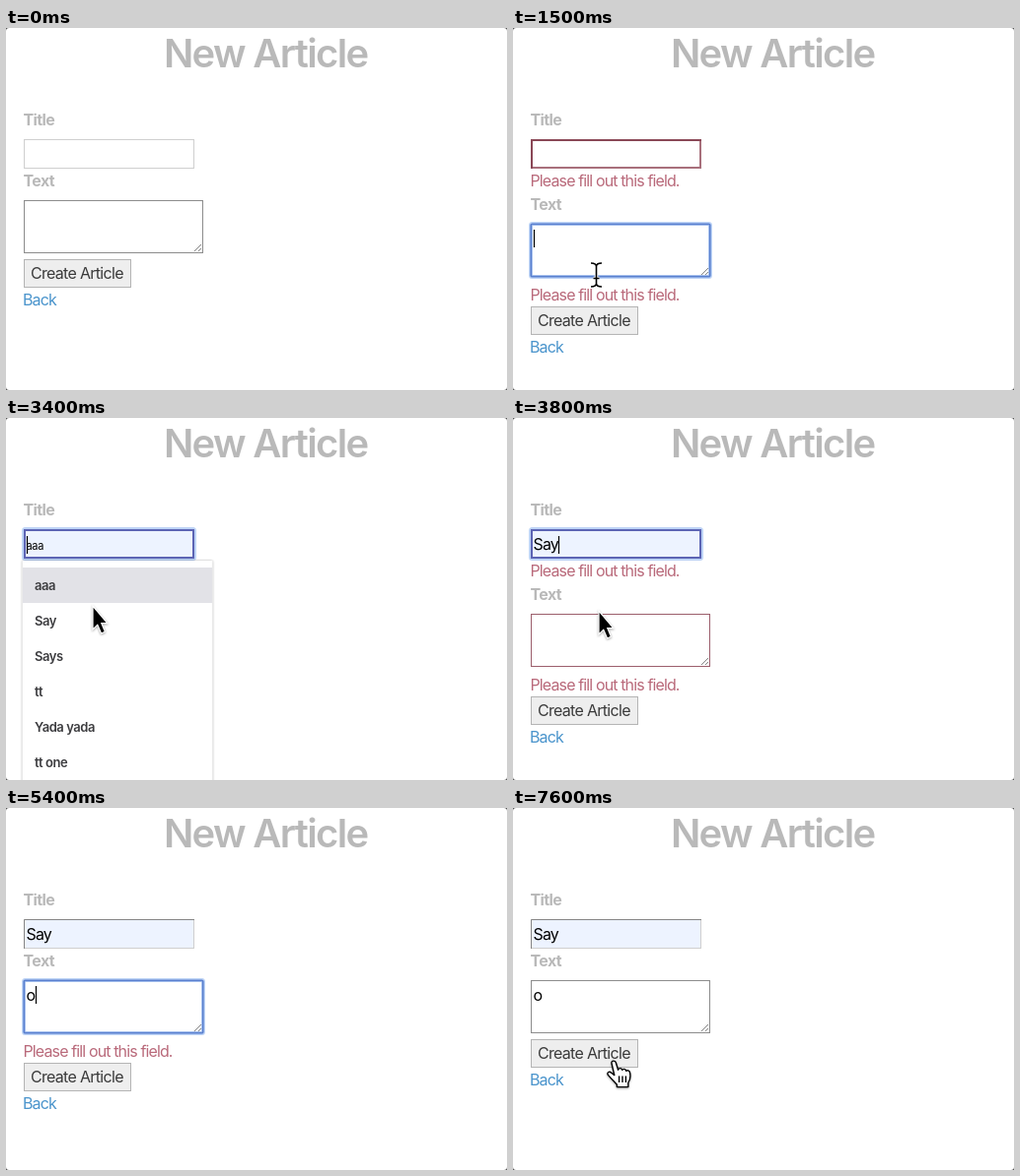
These frames come from a looping animation (508 px wide and 368 px high, 8000 ms). An HTML page:

```html
<!DOCTYPE html>
<html lang="en">
<head>
<meta charset="utf-8">
<title>New Article</title>
<style>
  html, body { margin: 0; width: 100%; height: 100%; overflow: hidden; background: #fff; }
  svg { display: block; width: 508px; height: 368px; }
  text { font: 400 16px Inter, "Open Sans", sans-serif; font-optical-sizing: none; letter-spacing: -.85px; }
  .heading { font-size: 40px; font-weight: 600; letter-spacing: -1.65px; text-anchor: middle; fill: #b9b9b9; }
  .label { font-weight: 700; letter-spacing: -.6px; fill: #b9b9b9; }
  .error { fill: #b9697a; letter-spacing: -.87px; }
  .link { fill: #4a94cc; letter-spacing: -.9px; }
  .button { fill: #3a3a3a; letter-spacing: -.7px; }
  .preview { font-size: 11px; letter-spacing: -.35px; }
  .menu text { font-size: 13px; font-weight: 600; letter-spacing: -.45px; fill: #3c3c3f; }
  .menu .panel { fill: #fff; filter: drop-shadow(0 0 1px rgba(0, 0, 0, .35)); }
  .ring { fill: none; }
  .ring .glow { stroke: #7fa9ee; stroke-opacity: .5; stroke-width: 4; }
  .ring .line { stroke: #5a80cf; stroke-width: 1.8; }
  .caret { stroke: #000; stroke-width: 1.2; }
  .pointer { filter: drop-shadow(0 1px 1px rgba(0, 0, 0, .35)); }
</style>
</head>
<body>
<svg viewBox="0 0 508 368">
  <rect width="508" height="368" fill="#fff"/>
  <text class="heading" x="263.2" y="40">New Article</text>
  <text class="label" x="17.5" y="99">Title</text>

  <g id="title">
    <rect id="titleBox" x="18.5" y="113.5" width="172" height="29" stroke="#cfcfcf"/>
    <path id="titleEdge" d="M18.5 143V113.5H191" fill="none"/>
    <g id="titleRed" fill="none" stroke-width="2">
      <path d="M18 142H190V113" stroke="#a8707c"/>
      <path d="M19 143V114H191" stroke="#8a4756"/>
    </g>
    <g class="ring" id="titleRing">
      <rect class="glow" x="18" y="113" width="173" height="30" rx="1.5"/>
      <rect x="19" y="114" width="171" height="28" stroke="#5c64b4" stroke-width="2"/>
    </g>
    <text id="titleText" x="20.5" y="134"></text>
  </g>
  <text class="error" id="titleError" x="17.5" y="161">Please fill out this field.</text>

  <g id="body">
    <text class="label" x="17.5" y="161">Text</text>
    <rect id="bodyBox" x="18.5" y="175.5" width="181" height="53" fill="#fff"/>
    <g class="ring" id="bodyRing">
      <rect class="glow" x="18" y="175" width="182" height="54" rx="1.5"/>
      <rect class="line" x="18.3" y="175.3" width="181.4" height="53.4" rx="1"/>
    </g>
    <path d="M191 227l7-7M195 227l3-3" stroke="#777" stroke-width=".9"/>
    <text id="bodyText" x="20.5" y="196"></text>
    <text class="error" id="bodyError" x="17.5" y="253">Please fill out this field.</text>
  </g>

  <g id="footer">
    <rect x="18.5" y="235.5" width="108" height="28" fill="#eee" stroke="#b4b4b4"/>
    <text class="button" x="25" y="255">Create Article</text>
    <text class="link" x="17" y="282">Back</text>
  </g>

  <g class="menu" id="menu">
    <rect class="panel" x="16.5" y="145" width="193" height="240" rx="1"/>
    <rect id="hover" x="17" width="192" height="36" fill="#e2e2e7"/>
  </g>
  <path class="caret" id="caret"/>

  <g id="pointer">
    <g class="pointer" id="arrow">
      <path d="M0 0V24L4.8 19.2L8.6 28L12.4 26.3L8.8 17.6H14.8Z" fill="#000" stroke="#fff" stroke-width="1.2"/>
    </g>
    <g id="beam" fill="none">
      <path d="M-5-12Q.5-12 .5-8.5Q.5-12 6-12M.5-9V9M-5 12Q.5 12 .5 8.5Q.5 12 6 12M-2.5 3.5H3.5" stroke="#fff" stroke-width="3.4"/>
      <path d="M-5-12Q.5-12 .5-8.5Q.5-12 6-12M.5-9V9M-5 12Q.5 12 .5 8.5Q.5 12 6 12M-2.5 3.5H3.5" stroke="#000" stroke-width="1.6"/>
    </g>
    <g class="pointer" id="hand" stroke="#000" stroke-width="1.4" stroke-linejoin="round" stroke-linecap="round">
      <path fill="#fff" d="M-2 2.5C-2.6-.2 1.4-.8 2.3 1.8L4.6 9.2C5 7.2 8.2 7 8.8 9.4C9.4 7.8 12.2 8 12.8 10.3C13.6 9.2 16.2 9.6 16.6 12.2C17.3 16.2 17 19.6 14.8 22.4V26.6H3.4V24.2C.6 21.2-2.4 18.2-5.6 14.4C-7.2 11.6-4.2 10.2-2.2 12.2L.8 14.6Z"/>
      <path fill="none" d="M5.6 16v5.4M9 16v5.4M12.4 16v5.4"/>
    </g>
  </g>

  <path d="M0 0H3Q0 0 0 3ZM508 0V3Q508 0 505 0ZM0 368V365Q0 368 3 368ZM508 368H505Q508 368 508 365Z" fill="#444"/>
</svg>
<script>
const LOOP = 8000;
const $ = id => document.getElementById(id);
const svgNS = 'http://www.w3.org/2000/svg';

['aaa', 'Say', 'Says', 'tt', 'Yada yada', 'tt one'].forEach((word, i) => {
  const item = document.createElementNS(svgNS, 'text');
  item.setAttribute('x', 29);
  item.setAttribute('y', 175 + 36 * i);
  item.textContent = word;
  $('menu').append(item);
});

// start time, x, y, shape; the pointer moves in 100 ms steps
const moves = [
  [100, 338, 12, 'arrow'], [200, 262, 84, 'arrow'], [300, 168, 190, 'arrow'],
  [400, 76, 286, 'arrow'], [500, 36, 306, 'arrow'], [600, 66, 272, 'arrow'],
  [700, 84, 251, 'hand'], [1500, 84, 251, 'beam'],
  [2000, 88, 264, 'arrow'], [2100, 98, 290, 'hand'], [2200, 116, 262, 'arrow'],
  [2300, 124, 212, 'beam'], [2400, 122, 155, 'arrow'], [2500, 110, 118, 'beam'],
  [2600, 102, 121, 'beam'],
  [3100, 100, 130, 'beam'], [3200, 95, 154, 'arrow'], [3300, 90, 180, 'arrow'],
  [3400, 88, 191, 'arrow'], [3500, 87, 195, 'arrow'], [3600, 87, 196, 'arrow'],
  [4100, 89, 200, 'beam'], [4200, 91, 206, 'beam'], [4300, 93, 211, 'beam'],
  [5400, 0, 0, ''],
  [5900, 93, 214, 'beam'], [6000, 94, 232, 'arrow'], [6100, 96, 258, 'arrow'],
  [6200, 98, 278, 'hand'], [6300, 98, 274, 'hand'], [6400, 97, 270, 'hand'],
  [6600, 97, 270, 'arrow'],
  [7300, 98, 267, 'arrow'], [7400, 99, 265, 'arrow'], [7500, 101, 259, 'hand'],
  [7600, 102, 257, 'hand']
];

// start, end, x, top
const carets = [
  [1500, 2000, 21.5, 205], [2500, 2900, 21.5, 205], [2900, 3800, 21.5, 120],
  [3800, 4300, 46.5, 120], [4500, 5000, 21.5, 181], [5400, 5900, 30.5, 181],
  [6400, 6700, 30.5, 181]
];

const show = (id, on) => $(id).style.display = on ? '' : 'none';
const shift = (id, x, y) => $(id).setAttribute('transform', `translate(${x} ${y})`);
const set = (id, attrs) => {
  for (const key in attrs) $(id).setAttribute(key, attrs[key]);
};

function render(t) {
  const during = (from, to) => t >= from && t < to;
  const titleBad = during(1500, 4500);
  const bodyBad = during(1500, 6700);
  const titleFocus = during(2900, 4500);
  const bodyFocus = during(1500, 2900) || during(4500, 6700);
  const offset = titleBad ? 24 : 0;

  const filled = t >= 3300;
  const preview = during(3300, 3800);
  set('titleBox', { fill: filled ? '#edf3ff' : '#fff' });
  set('titleEdge', { stroke: filled ? '#858585' : '#cfcfcf' });
  show('titleRed', titleBad && !titleFocus);
  show('titleRing', titleFocus);
  show('titleError', titleBad);
  $('titleText').textContent = !filled ? '' : t < 3600 ? 'aaa' : 'Say';
  set('titleText', { class: preview ? 'preview' : '' });

  shift('body', 0, offset);
  set('bodyBox', { stroke: bodyBad ? '#9c5f6c' : '#8c8c8c' });
  show('bodyRing', bodyFocus);
  show('bodyError', bodyBad);
  $('bodyText').textContent = t >= 5400 ? 'o' : '';
  shift('footer', 0, offset + (bodyBad ? 24 : 0));

  show('menu', during(2900, 3800));
  show('hover', preview);
  set('hover', { y: t < 3600 ? 152 : 188 });

  const caret = carets.find(c => during(c[0], c[1]));
  show('caret', caret);
  if (caret) set('caret', { d: `M${caret[2]} ${caret[3]}v18` });

  const [, x, y, shape] = moves.findLast(m => m[0] <= t) || [0, 0, 0, ''];
  shift('pointer', x, y);
  for (const id of ['arrow', 'beam', 'hand']) show(id, id === shape);
}

const start = performance.now();
function tick() {
  render((performance.now() - start) % LOOP);
  requestAnimationFrame(tick);
}
tick();
</script>
</body>
</html>
```
